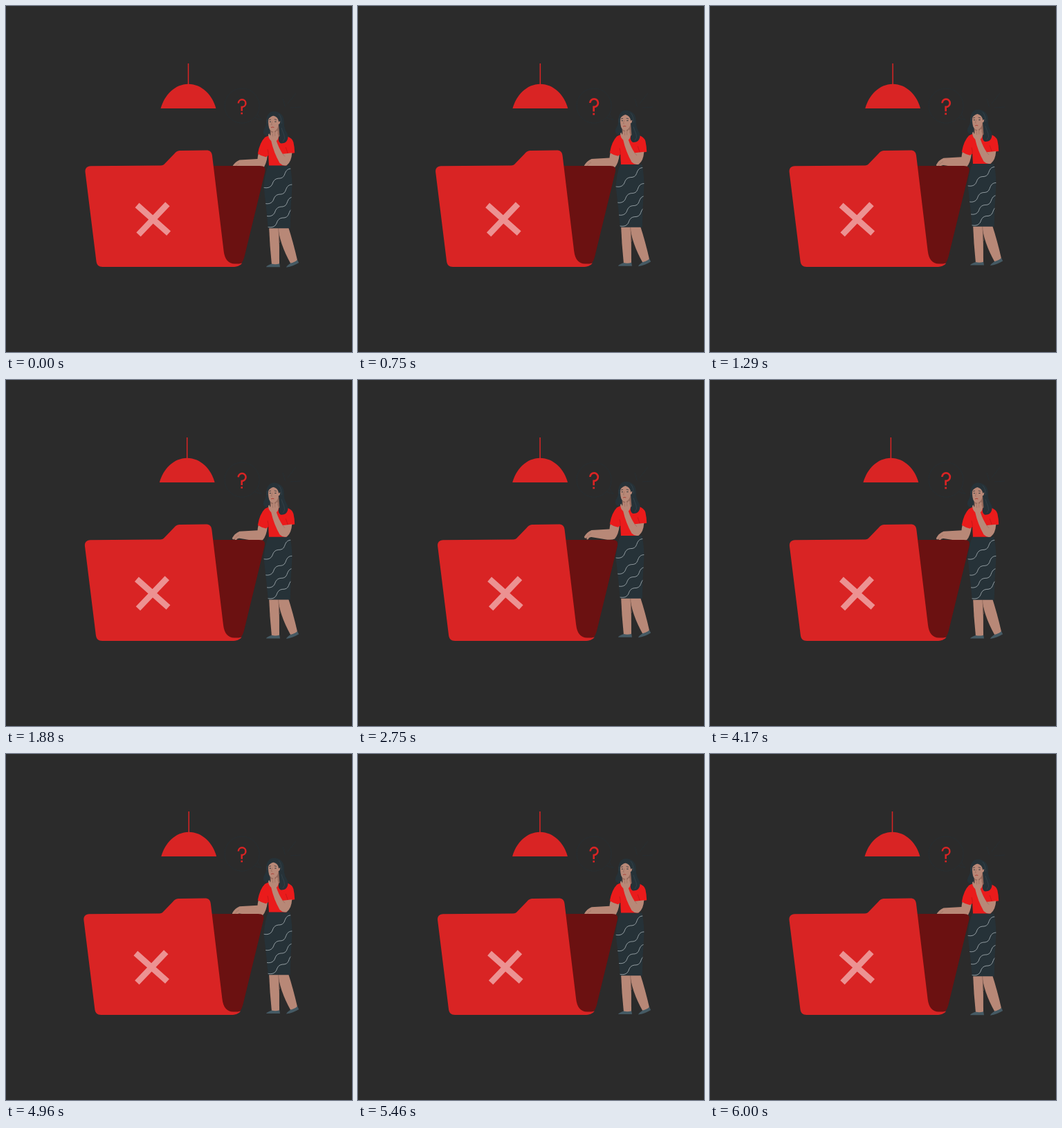
An HTML page with a canvas for the animation above (6040 ms loop, 500x500 px).

```html
<!DOCTYPE html>
<html lang="en">
<head>
<meta charset="utf-8">
<title>Empty folder</title>
<style>
html, body { margin: 0; width: 100%; height: 100%; overflow: hidden; background: #2b2b2b; }
canvas { display: block; width: 100vmin; height: 100vmin; }
</style>
</head>
<body>
<canvas id="stage"></canvas>
<script>
const SIZE = 500, LOOP = 6040, FPS = 24, UNIT = 0.6;
const BACK = '#2b2b2b', RED = '#d92424', DEEP = '#6b1111', BLOUSE = '#ea1b1b';
const SKIN = '#b88877', SHADE = '#94695b', HAIR = '#263238', SHOE = '#455a64';

const canvas = document.getElementById('stage');
const ctx = canvas.getContext('2d');
const ratio = window.devicePixelRatio || 1;
canvas.width = canvas.height = SIZE * ratio;

// [progress, value] pairs joined by straight lines
const SHAKE = [[0, 0], [.1, -1], [.2, 2], [.3, -4], [.4, 4], [.5, -4],
               [.6, 4], [.7, -4], [.8, 2], [.9, -1], [1, 0]];
const FLOAT = [[0, 0], [.5, -10], [1, 0]];
const BEAT = [[0, 1], [.1, 1.1], [.3, 1], [.4, 1], [.5, 1.1], [.6, 1], [.8, 1.1], [1, 1]];

function track(keys, t, period) {
  const p = (t % period) / period;
  const i = keys.findIndex(k => k[0] > p);
  const [p0, v0] = keys[i - 1], [p1, v1] = keys[i];
  return v0 + (v1 - v0) * (p - p0) / (p1 - p0);
}

function fill(d, color) {
  ctx.fillStyle = color;
  ctx.fill(new Path2D(d));
}

function line(d, color, width, cap = 'butt') {
  ctx.strokeStyle = color;
  ctx.lineWidth = width;
  ctx.lineCap = cap;
  ctx.stroke(new Path2D(d));
}

function moved(x, y, draw) {
  ctx.save();
  ctx.translate(x, y);
  draw();
  ctx.restore();
}

function lamp() {
  line('M263.5 83V114', RED, 1.5);
  fill('M223.6 148.1C228.6 129 244 112.7 263.5 112.7S298.6 129 303.4 148.1Z', RED);
}

function question() {
  line('M335.8 140.5A5.3 5.3 0 1 1 341 145.9H340.7V151.8', RED, 2.5);
  fill('M339.4 153.9h2.6v2.5h-2.6Z', RED);
}

// faint speech bubble around the question mark
function bubble() {
  line('M362.5 157A25 25 0 1 1 366 146Q365.5 152 363.5 156Q365 161 369.5 164.5Q364 164 359.5 161.5',
       HAIR, .6);
}

function sparks() {
  line('M400 134L403.5 146M419 126L407 141M426 146L411 147', HAIR, .6);
}

function folder() {
  fill('M299 231H366.5C373.5 231 375.5 234 374.2 240L344.6 362C342.5 370 339 375 332 375H309Z', DEEP);
  fill('M114.6 240.5C113.9 234.5 117 231.3 122.5 231.2L223.5 230.5C226.5 230.4 228 229.6 230 227.3' +
       'L243.3 213.4C246.4 210.1 248.4 209.1 252.4 209L289.4 208.6C294.9 208.6 297.3 211 298 216.5' +
       'L314.6 354C316 366 321.5 372.5 330.5 372.5C335.5 372.5 338.5 372.3 341.3 371.4' +
       'C338.5 375 334 377 327 377H139.5C134 377 131.2 374.3 130.5 369Z', RED);
  line('M189.5 287.9L235.1 328.5M233.4 286.3L191.5 330.3', '#ec9292', 8.8);
}

function legs() {
  fill('M380 318L393.5 318Q395.5 345 395 374H384Q381 345 380 318Z', SKIN);
  fill('M393 318H407.5Q415 341 421.2 368L411.5 372.5Q395 343 393 318Z', SKIN);
  line('M393.8 321Q394.6 334 395.4 342', SHADE, .6);
  fill('M384 372.6Q389.5 374 395.2 372.3L396 377.2H376Q376.5 375.3 384 372.6Z', SHOE);
  fill('M411.3 371.5Q417 371 421 366.7L423.2 371Q415 376 405 377.7Q405.5 375.6 411.3 371.5Z', SHOE);
}

function skirt() {
  const shape = new Path2D('M379 230.5H410.5Q414.5 250 413 269Q411 295 410.8 321.3' +
                           'H378.8Q376.4 292 372.6 263Q373.5 243 379 230.5Z');
  ctx.save();
  ctx.fillStyle = HAIR;
  ctx.fill(shape);
  ctx.clip(shape);
  for (const [x, y] of [[371, 262], [372.5, 285], [374.5, 303], [377, 319]]) {
    line(`M${x} ${y}c7 2 12 0 14 -5c2 -6 5 -8 11 -8c6 -1 6 -5 8 -9c2 -4 5 -5 9 -5`,
         '#b8c2c6', .75);
  }
  ctx.restore();
}

function restingArm() {
  fill('M366 211L378 215Q376.5 229 371 235Q366 237.2 357 235.7L337.5 232.6Q334 232.2 332.6 235.4' +
       'Q329.8 237.2 330.5 233Q328 235.8 326.8 232.3Q330.5 225.2 337.5 222.4L363.5 220.9' +
       'Q364 214 366 211Z', SKIN);
  line('M337 227.4Q333 229 330.8 233', SHADE, .5);
}

function hair() {
  fill('M379.5 156C382 152 389 150.8 395 154.4C400.5 157.6 402 162.5 401.8 169' +
       'C401.8 178 405.5 181 407.4 187C408.5 194 404.5 199.5 396 199' +
       'L381 188C374.5 188 371 185.5 372.2 180.5C373.5 176.5 375.6 174.5 376 170C376 164 376.5 159.5 379.5 156Z', HAIR);
  line('M394 156C400 162 397 174 401 181C404.5 187 405 193 399 197' +
       'M377.4 164C377.6 172 377.6 176 375.4 182', '#3a4b54', .6);
}

function head() {
  fill('M381.5 176L394 171L395.5 188Q388 195 382 188Z', SHADE);
  fill('M379.8 161C383 157.5 390.5 157 394 162Q396.8 164.6 396 168.5Q395.4 171.2 393.7 171' +
       'Q393 178.8 387 181.5Q382.3 181.5 380.2 176.5Q378 168 379.8 161Z', SKIN);
  fill('M378.8 164C378.7 158 384 153.8 390.5 155.5Q397 158 396.2 166L394.2 167.5' +
       'Q393.2 160.2 386.5 158.6Q381.8 159.8 378.8 164Z', HAIR);
  line('M380 164.5L383 163.9M387.7 163.7L391 164.5', HAIR, .7);
  line('M381.2 167.3h1.2M388.7 167.2h1.5', HAIR, 1, 'round');
  line('M385 166.5L383.3 171.4L385 171.8', SHADE, .6);
  line('M383.4 175.4Q385.2 174.4 387 175.3', '#a8362f', .9, 'round');
}

function torso() {
  fill('M374.2 189.8Q379 186.8 383 187L395 188.5L405.5 188Q414 191 415.4 197Q417 204 417.2 212.3' +
       'L407 213.8Q404.5 222 405.8 231.8H380L379.2 216L375.6 218.3Q369 216.8 363.8 213.4' +
       'Q366.8 197 374.2 189.8Z', BLOUSE);
  line('M378 207Q379.6 212 379.2 217M404.2 204L407.5 213.5', '#b01417', .6);
}

function thinkingArm() {
  fill('M402.5 213.5L413.3 212.3Q412.5 225 406 230Q400.5 232 395.5 227Q387 212 383.2 195' +
       'Q379.3 191.5 379 186L380.3 184Q381.3 187 382.5 187.5L383.3 182.2Q385 181.2 385.3 184.5' +
       'L386.5 180.8Q388.3 180 388.6 183.5L391.3 180Q393.4 180.3 392.5 184L393.7 188Q394 192 390.8 195' +
       'Q394.5 206 399.8 213.8Z', SKIN);
  line('M385.3 184.4L385.7 188.5M388.6 183.5L388.8 188M399.8 213.8L403 217.5', SHADE, .6);
}

function woman() {
  legs();
  restingArm();
  hair();
  torso();
  skirt();
  // locks falling over the shoulder
  fill('M394.5 168L401.5 171C402 179 406 181.5 407.4 187C408.2 194 404.5 199 397 198.5' +
       'Q392.5 196 394.3 188Q396 178 394.5 168Z' +
       'M376.5 169L380 173L382 187C375 188.6 371 185.5 372.2 180.5C373.5 176.5 376 174.5 376.5 169Z', HAIR);
  line('M398 176Q400 182 402 187T400 196', '#3a4b54', .6);
  head();
  thinkingArm();
}

function render(t) {
  ctx.setTransform(ratio, 0, 0, ratio, 0, 0);
  ctx.fillStyle = BACK;
  ctx.fillRect(0, 0, SIZE, SIZE);

  moved(track(SHAKE, t, 6000) * UNIT, 0, lamp);
  sparks();
  moved(0, track(FLOAT, t, 6000) * UNIT, woman);
  moved(track(SHAKE, t, 1500) * UNIT, 0, folder);

  const beat = track(BEAT, t, 1500);
  bubble();
  moved(341, 145.5, () => {
    ctx.scale(beat, beat);
    ctx.translate(-341, -145.5);
    question();
  });
}

const start = performance.now();
function tick() {
  const t = (performance.now() - start) % LOOP;
  // hold each drawing for 1/24 s; the small bias absorbs timer rounding
  render(Math.floor(t * FPS / 1000 + 0.1) * 1000 / FPS);
  requestAnimationFrame(tick);
}
tick();
</script>
</body>
</html>
```
